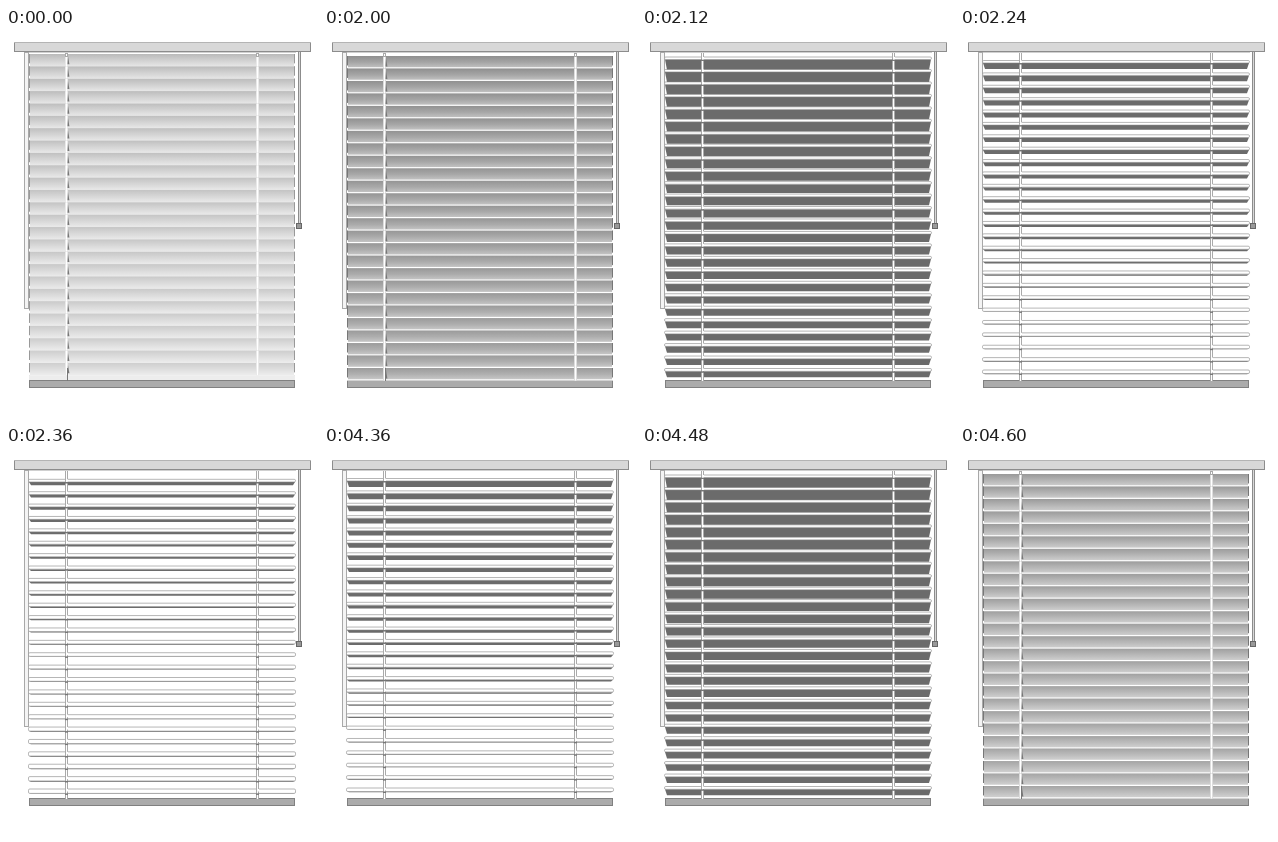
These frames come from a looping animation (312 by 390 pixels, 4.72 s). An HTML page with a canvas:

```html
<!DOCTYPE html>
<html lang="en">
<head>
<meta charset="utf-8">
<title>Venetian blind</title>
<style>
html, body { margin: 0; width: 100%; height: 100%; overflow: hidden; background: #fff; }
canvas { display: block; width: 312px; height: 390px; }
</style>
</head>
<body>
<canvas id="stage" width="312" height="390"></canvas>
<script>
const ctx = document.getElementById('stage').getContext('2d');
const COUNT = 26, LOOP = 4720;
const LEFT = 23, RIGHT = 289;

// Shut poses use a shade ramp; tilted ones run from the first slat to the last.
const shut    = { top: 26, pitch: 12.36, ramp: ['#bababa', '#d0d0d0', '#e6e6e6'], seam: '#f0f0f0', lift: 0.3 };
const ajar    = { top: 28, pitch: 12.48, ramp: ['#8f8f8f', '#a5a5a5', '#c6c6c6'], seam: '#fff', lift: 0.12 };
const closing = { top: 28, pitch: 12.48, ramp: ['#999999', '#b4b4b4', '#d0d0d0'], seam: '#fff', lift: 0.12 };
const tilted  = { top: [29, 340.5], lip: [2.5, 2.8], under: [10.5, 6] };
const nearly  = { top: [32.5, 342], lip: [2.5, 3.5], under: [6, -0.6] };
const open    = { top: [33.3, 343], lip: [2.7, 4.4], under: [3.2, -1.4] };

const steps = [
  [2000, shut], [2120, ajar], [2240, tilted], [2360, nearly],
  [4360, open], [4480, nearly], [4600, tilted], [LOOP, closing]
];

const mix = ([a, b], k) => a + (b - a) * k;

function rect(x, y, w, h, fill) {
  ctx.fillStyle = fill;
  ctx.fillRect(x, y, w, h);
}

function poly(fill, ...points) {
  ctx.fillStyle = fill;
  ctx.beginPath();
  points.forEach(([x, y]) => ctx.lineTo(x, y));
  ctx.fill();
}

function box(x, y, w, h, fill, line) {
  rect(x, y, w, h, line);
  rect(x + 1, y + 1, w - 2, h - 2, fill);
}

function shutSlat(pose, i) {
  const y = pose.top + i * pose.pitch, h = pose.pitch;
  const shade = ctx.createLinearGradient(0, y, 0, y + h);
  pose.ramp.forEach((c, n) => shade.addColorStop(n / 2, c));
  rect(LEFT, y, RIGHT - LEFT, h, shade);
  rect(LEFT, y, RIGHT - LEFT, h, `rgba(255,255,255,${pose.lift * i / COUNT})`);
  const flat = pose === shut;
  if (!flat) rect(LEFT, y + h - 1.2, RIGHT - LEFT, 1.2, pose.seam);
  for (const x of [LEFT, RIGHT - 1]) {
    rect(x, y, 1, h, flat ? '#999' : '#777');
    rect(x, y + h - 3, 1, 3, '#fff');
  }
  for (const x of [60, 251]) {
    rect(x - 1, y, 3, h, flat ? '#e9e9e9' : '#ddd');
    rect(x, y, 1, h, '#fff');
  }
  poly('#777', [62, y + 2], [63.4, y + h - 2], [61.5, y + h - 2]);
}

function tiltedSlat(pose, i) {
  const k = i / (COUNT - 1);
  const y = mix(pose.top, k), lip = mix(pose.lip, k);
  const under = Math.max(0.7, mix(pose.under, k));
  const base = y + lip;
  poly('#6b6b6b', [LEFT, base], [RIGHT, base], [RIGHT - 2, base + under], [LEFT + 2, base + under]);
  ctx.beginPath();
  ctx.roundRect(22.5, y, 267, lip, 1.3);
  ctx.fillStyle = '#fff';
  ctx.fill();
  ctx.lineWidth = 0.6;
  ctx.strokeStyle = '#858585';
  ctx.stroke();
}

function cords(pose) {
  for (const x of [59, 250]) {
    rect(x, 25, 1, 328, '#aaa');
    rect(x + 1, 25, 1, 328, '#fff');
    rect(x + 2, 25, 1, 328, '#aaa');
    for (let i = 0; i < COUNT; i++) {
      const k = i / (COUNT - 1), y = mix(pose.top, k);
      rect(x, y + mix(pose.lip, k), 3, 1.5, '#777');
      rect(x + 1, y, 2, 2.5, '#fff');
    }
  }
}

function frame() {
  box(8, 14, 297, 10, '#d8d8d8', '#8c8c8c');
  rect(8, 14, 297, 1, '#b4b4b4');
  rect(22, 24, 268, 1, '#d0d0d0');
  box(18, 24, 5, 257, '#f4f4f4', '#a8a8a8');
  rect(292, 24, 3, 171, '#8c8c8c');
  rect(293, 24, 1, 171, '#d8d8d8');
  box(290, 195, 6, 6, '#999', '#666');
  box(23, 352, 266, 8, '#ababab', '#808080');
}

function draw(pose) {
  rect(0, 0, 312, 390, '#fff');
  frame();
  for (let i = 0; i < COUNT; i++) (pose.ramp ? shutSlat : tiltedSlat)(pose, i);
  if (pose.ramp) {
    const end = pose.top + COUNT * pose.pitch;
    rect(LEFT, end, RIGHT - LEFT, Math.max(0, 352 - end), '#ededed');
    rect(61, 340, 1, 13, '#777');
    for (const x of [59, 250]) box(x, 25, 3, 4, '#fff', '#aaa');
  } else {
    cords(pose);
  }
}

let shown;
function tick(now) {
  const t = now % LOOP;
  const pose = steps.find(([end]) => t < end)[1];
  if (pose !== shown) draw(shown = pose);
  requestAnimationFrame(tick);
}
tick(performance.now());
</script>
</body>
</html>
```
